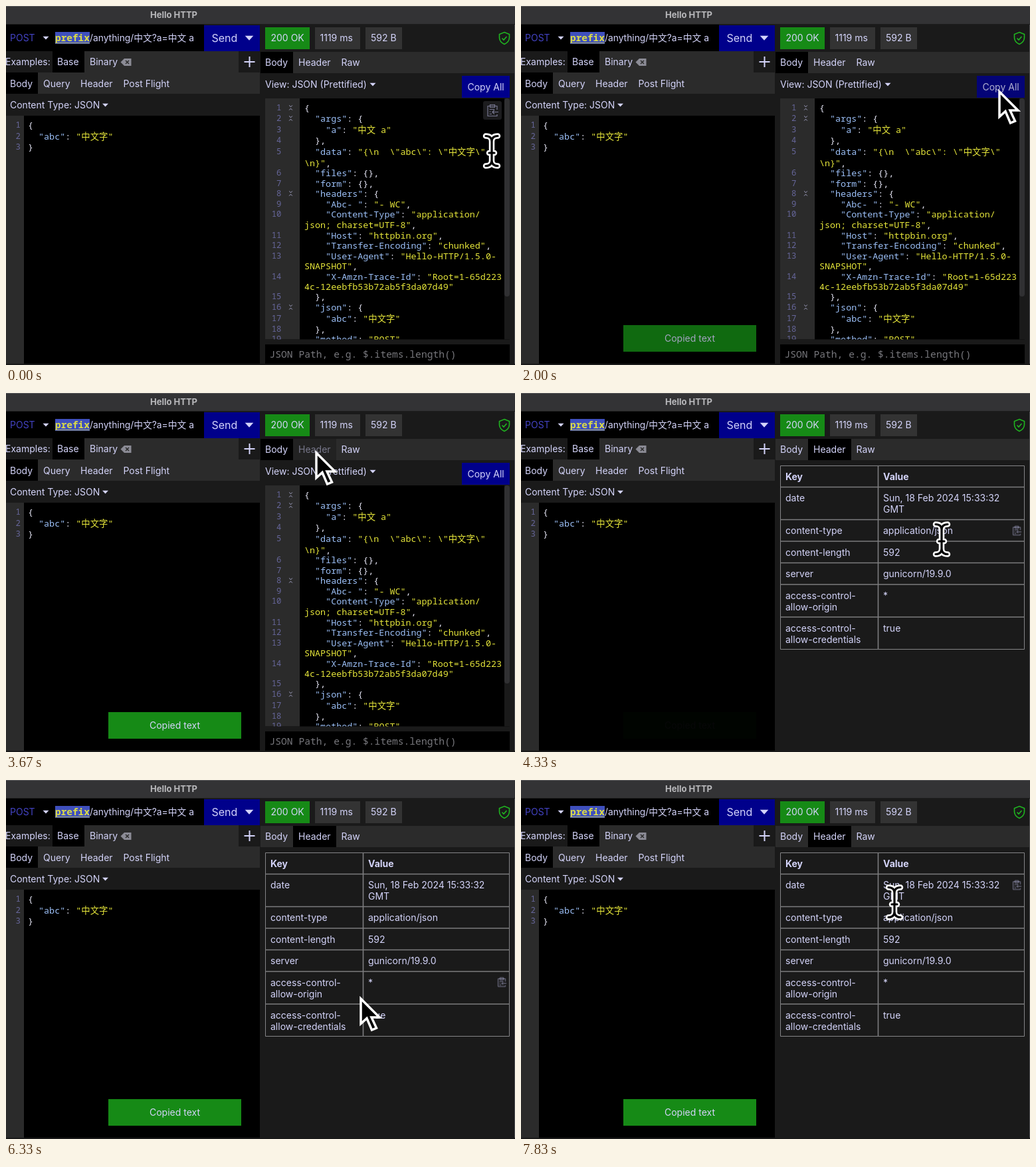
An HTML page that plays this animation: 766 by 540 pixels, repeating every 8000 ms.

```html
<!DOCTYPE html>
<html lang="en">
<head>
<meta charset="utf-8">
<title>Hello HTTP</title>
<style>
  html, body { margin: 0; width: 100%; height: 100%; overflow: hidden; background: #000; }
  svg { display: block; width: 100vw; height: 100vh; }
  text { white-space: pre; font: 14px Inter, "Noto Sans CJK SC", sans-serif; fill: #d4d4fa; }
  .mono text, text.mono { font: 13.38px "Noto Sans Mono", "Noto Sans CJK SC", monospace; fill: #e6e6f6; }
  .mono .key { fill: #9cc0f8; }
  .mono .str { fill: #e6e63a; }
  .mono .num { font-size: 12.3px; fill: #66669a; text-anchor: end; }
  .line { fill: none; stroke: #a8a8cc; }
  .blue { fill: #00008b; }
  .gray { fill: #2b2b2b; }
  .dark { fill: #1a1a1a; }
  .tile { fill: #333; }

  .anim { animation: 8s step-end infinite paused; }
  #bodyView { animation-name: leave; }
  #headerView { animation-name: enter; }
  #headerTab { animation-name: tabHover; }
  #copyAll { animation-name: copyHover; }
  #editorCopy { animation-name: editorCopy; }
  #rowCopy { animation-name: rowCopy; }
  #toast { animation-name: toast; animation-timing-function: linear; }
  #pointer { animation-name: move; animation-timing-function: ease-in-out; }
  #shape { animation-name: shape; }
  #arrow { opacity: var(--arrow); }
  #beam { opacity: calc(1 - var(--arrow)); }

  @keyframes leave { 0% { opacity: 1 } 48.9% { opacity: 0 } }
  @keyframes enter { 0% { opacity: 0 } 48.9% { opacity: 1 } }
  @keyframes tabHover { 0% { opacity: 1 } 42% { opacity: .5 } 50% { opacity: 1 } }
  @keyframes copyHover { 0% { opacity: 1 } 20.5% { opacity: .82 } 38.5% { opacity: 1 } }
  @keyframes editorCopy { 0% { opacity: 1 } 6% { opacity: .55 } 18.5% { opacity: 0 } }
  @keyframes rowCopy {
    0% { opacity: 0; transform: translate(746px, 207px) }
    53% { opacity: 1; transform: translate(746px, 207px) }
    60% { opacity: .6; transform: translate(746px, 207px) }
    75% { opacity: 0; transform: translate(746px, 304px) }
    77.8% { opacity: 1; transform: translate(746px, 304px) }
    84.5% { opacity: .6; transform: translate(746px, 304px) }
    92% { opacity: 0; transform: translate(746px, 158px) }
    95% { opacity: 1; transform: translate(746px, 158px) }
  }
  @keyframes toast {
    0%, 7.5% { opacity: 0 }
    10%, 23.5% { opacity: 1 }
    25% { opacity: .77 }
    28%, 29.5% { opacity: 0 }
    32%, 48% { opacity: 1 }
    54.17% { opacity: .03 }
    54.5%, 64.5% { opacity: 0 }
    67%, 100% { opacity: 1 }
  }
  @keyframes move {
    0%, 2% { transform: translate(731px, 218px) }
    8%, 16.5% { transform: translate(731px, 157px) }
    22.5%, 37% { transform: translate(718px, 124px) }
    43%, 49% { transform: translate(465px, 85px) }
    54.17%, 56.5% { transform: translate(633px, 220px) }
    62%, 73% { transform: translate(746px, 207px) }
    79.17% { transform: translate(532px, 324px) }
    85.4%, 90% { transform: translate(746px, 304px) }
    97.9%, 100% { transform: translate(562px, 184px) }
  }
  @keyframes shape {
    0% { --arrow: 0 } 5% { --arrow: 1 }
    51% { --arrow: 0 } 60% { --arrow: 1 }
    74.5% { --arrow: 0 } 78.5% { --arrow: 1 }
    80.5% { --arrow: 0 } 84.5% { --arrow: 1 }
    91% { --arrow: 0 }
  }
</style>
</head>
<body>
<svg viewBox="0 0 766 540" preserveAspectRatio="none">
  <defs>
    <path id="down" d="M-4.5 -2.3H4.5L0 2.6Z" fill="#d4d4fa"/>
    <path id="fold" class="line" d="M-2.3 -3.5L0 -1.2 2.3 -3.5M-2.3 3.5L0 1.2 2.3 3.5"/>
    <g id="clip" class="line" stroke-width="1.2">
      <path d="M7 -1V-6.5H-7V8.5H7V6M-3.5 -6.5V-8.5H3.5V-4.5H-3.5V-6.5M9 2.5H0M3 -.5L0 2.5 3 5.5M-4.5 -1.5H3M-4.5 2H-2.5M-4.5 5.5H-1"/>
    </g>
    <clipPath id="editorClip"><rect x="390" y="139" width="368" height="362.5"/></clipPath>
  </defs>

  <!-- window -->
  <rect class="dark" width="766" height="540"/>
  <rect width="766" height="28" fill="#333335"/>
  <path d="M0 .5H766" stroke="#5a5a5c"/>
  <path d="M0 27.5H766" stroke="#1c1c1c"/>
  <text x="217" y="18" style="font-size:13px;font-weight:700;fill:#b9b9bc">Hello HTTP</text>

  <!-- request -->
  <rect y="28" width="298" height="40"/>
  <text x="6" y="53" style="fill:#4343c4">POST</text>
  <use href="#down" x="60" y="48"/>
  <rect x="74" y="39" width="52" height="18" fill="#3f50bd"/>
  <text class="mono" x="74" y="53" style="font-size:14.4px;font-weight:600;fill:#dcdc46">prefix</text>
  <path d="M74 55.5H126" stroke="#b5b860"/>
  <text x="126" y="53" style="font-size:13.8px">/anything/中文?a=中文 a</text>
  <rect class="blue" x="298" y="29" width="84" height="39"/>
  <text x="309.5" y="54" style="font-size:16px">Send</text>
  <use href="#down" transform="translate(366 48) scale(1.4)"/>

  <rect class="gray" y="68" width="382" height="64"/>
  <rect class="dark" y="68" width="70" height="32"/>
  <rect x="70" y="68" width="48" height="32"/>
  <rect class="dark" x="350" y="68" width="32" height="32"/>
  <text x="-1" y="89">Examples:</text>
  <text x="77" y="89">Base</text>
  <text x="126" y="89">Binary</text>
  <path d="M172.5 84.5L178 79H188.5V90H178Z" fill="#8b8b95"/>
  <path d="M180 82L185 87M185 82L180 87" stroke="#2b2b2b" stroke-width="1.5"/>
  <path d="M358.5 84H374.5M366.5 76V92" stroke="#d4d4fa" stroke-width="2"/>
  <rect y="100" width="48" height="32"/>
  <text x="6" y="122">Body</text>
  <text x="56" y="122">Query</text>
  <text x="112" y="122">Header</text>
  <text x="176.5" y="122">Post Flight</text>

  <text x="6" y="154">Content Type: JSON</text>
  <use href="#down" x="149.5" y="149"/>
  <rect x="27" y="165" width="355" height="373"/>
  <rect class="gray" y="165" width="27" height="373"/>
  <g id="requestCode" class="mono"></g>

  <!-- response -->
  <rect x="390" y="32" width="67" height="33" fill="#168a16"/>
  <rect class="tile" x="465" y="32" width="68" height="33"/>
  <rect class="tile" x="541" y="32" width="55" height="33"/>
  <text x="398.5" y="53">200 OK</text>
  <text x="472.5" y="53">1119 ms</text>
  <text x="549" y="53">592 B</text>
  <path d="M750 39.5L757.5 42.5V48Q757 54.5 750 57.5Q743 54.5 742.5 48V42.5ZM746.5 48.5L749 51 753.5 46" fill="none" stroke="#20b520" stroke-width="1.6"/>
  <rect class="gray" x="383" y="69" width="382" height="32"/>

  <g id="bodyView" class="anim">
    <rect x="383" y="69" width="49" height="32"/>
    <text x="390" y="123">View: JSON (Prettified)</text>
    <use href="#down" x="552" y="118"/>
    <g id="copyAll" class="anim">
      <rect class="blue" x="686" y="105" width="72" height="33"/>
      <text x="694.5" y="127">Copy All</text>
    </g>
    <g clip-path="url(#editorClip)">
      <rect x="390" y="139" width="368" height="363"/>
      <rect class="gray" x="390" y="139" width="52" height="363"/>
      <rect class="dark" x="750" y="139" width="8" height="363"/>
      <rect x="750" y="139" width="8" height="298" rx="4" fill="#303032"/>
      <g id="responseCode" class="mono"></g>
    </g>
    <g id="editorCopy" class="anim">
      <rect x="718" y="143" width="28" height="28" rx="3" fill="#1c1c1e"/>
      <use href="#clip" x="732" y="157" opacity=".65"/>
    </g>
    <rect x="390" y="509" width="368" height="29"/>
    <text class="mono" x="396.5" y="529" style="font-size:14.65px;fill:#77777c">JSON Path, e.g. $.items.length()</text>
  </g>

  <g id="headerView" class="anim">
    <path d="M390.5 109.5H757.5V385.5H390.5Z" fill="none" stroke="#858587"/>
    <path d="M390 141.5H758M390 190.5H758M390 223H758M390 255.5H758M390 288H758M390 337H758M537.5 109V386" stroke="#7c7c7e" stroke-width="1.6"/>
    <g id="headerCells"></g>
    <g id="rowCopy" class="anim"><use href="#clip" transform="scale(.78)" opacity=".75"/></g>
  </g>

  <text x="390" y="90">Body</text>
  <rect class="dark" x="432" y="69" width="65" height="32"/>
  <g id="headerTab" class="anim">
    <rect class="gray" x="432" y="69" width="65" height="32"/>
    <g class="anim" style="animation-name:enter"><rect x="432" y="69" width="65" height="32"/></g>
    <text x="440" y="90">Header</text>
  </g>
  <text x="504.5" y="90">Raw</text>
  <path d="M765.5 28V540" stroke="#4e4e50"/>
  <path d="M0 539H766" stroke="#1a1a1a" stroke-width="2"/>

  <g id="toast" class="anim">
    <rect x="154" y="480" width="200" height="40" fill="#168a16"/>
    <text x="254" y="505" text-anchor="middle">Copied text</text>
  </g>

  <g id="pointer" class="anim"><g id="shape" class="anim">
    <path id="arrow" d="M2 5V42.5L11 34.500 18.500 52 25.500 49 18 33H30Z" stroke="#fff" stroke-width="3.500"/>
    <g id="beam" fill="none" stroke-linecap="round">
      <path id="beamPath" d="M-9 -22.500Q0 -22.500 0 -14V14Q0 22.500 -9 22.500M9 -22.500Q0 -22.500 0 -14M0 14Q0 22.500 9 22.500M-4 3H4" stroke="#fff" stroke-width="8.500"/>
      <use href="#beamPath" id="beamCore"/>
    </g>
  </g></g>
</svg>
<script>
const NS = 'http://www.w3.org/2000/svg';
const $ = id => document.getElementById(id);

function add(parent, tag, attrs, content = '') {
  const node = document.createElementNS(NS, tag);
  for (const name in attrs) node.setAttribute(name, attrs[name]);
  node.textContent = content;
  parent.append(node);
  return node;
}

// The beam's dark core repeats its outline with a thinner stroke.
const core = $('beamPath').cloneNode();
core.removeAttribute('id');
core.setAttribute('stroke', '#000');
core.setAttribute('stroke-width', 3.2);
$('beamCore').replaceWith(core);

function codeLine(parent, x, y, source) {
  const line = add(parent, 'text', { x, y });
  const wrapped = !/^[\s{}]/.test(source);
  const tokens = wrapped
    ? source.match(/.*"|.+/g)
    : source.match(/"(?:\\.|[^"\\])*"?|[^"]+/g);
  tokens.forEach((token, i) => {
    const isString = token[0] === '"' || (wrapped && i === 0);
    const isKey = isString && tokens[i + 1]?.startsWith(':');
    add(line, 'tspan', { class: isKey ? 'key' : isString ? 'str' : '' }, token);
  });
}

// Rows are [centre y, text]; wrapped continuations carry no number.
function codeBlock(parent, x, numberX, rows, foldX) {
  let number = 0;
  for (const [y, source] of rows) {
    codeLine(parent, x, y + 4.5, source);
    if (!/^[\s{}]/.test(source)) continue;
    add(parent, 'text', { class: 'num', x: numberX, y: y + 4 }, ++number);
    if (foldX && source.endsWith('{')) add(parent, 'use', { href: '#fold', x: foldX, y });
  }
}

codeBlock($('requestCode'), 33, 22, [
  [179, '{'], [196, '  "abc": "中文字"'], [212, '}']
]);

codeBlock($('responseCode'), 449, 414.5, [
  [153, '{'],
  [169, '  "args": {'],
  [186, '    "a": "中文 a"'],
  [202, '  },'],
  [219, String.raw`  "data": "{\n  \"abc\": \"中文字\"`],
  [236, String.raw`\n}",`],
  [251, '  "files": {},'],
  [267, '  "form": {},'],
  [282, '  "headers": {'],
  [298, '    "Abc- ": "- WC",'],
  [313, '    "Content-Type": "application/'],
  [329, 'json; charset=UTF-8",'],
  [345, '    "Host": "httpbin.org",'],
  [360, '    "Transfer-Encoding": "chunked",'],
  [376, '    "User-Agent": "Hello-HTTP/1.5.0-'],
  [391, 'SNAPSHOT",'],
  [407, '    "X-Amzn-Trace-Id": "Root=1-65d223'],
  [422, '4c-12eebfb53b72ab5f3da07d49"'],
  [437, '  },'],
  [453, '  "json": {'],
  [470, '    "abc": "中文字"'],
  [486, '  },'],
  [501, '  "method": "POST",']
], 428.5);

const headers = [
  [131, 'Key', 'Value'],
  [163, 'date', 'Sun, 18 Feb 2024 15:33:32|GMT'],
  [212, 'content-type', 'application/json'],
  [245, 'content-length', '592'],
  [277, 'server', 'gunicorn/19.9.0'],
  [310, 'access-control-|allow-origin', '*'],
  [359, 'access-control-|allow-credentials', 'true']
];
headers.forEach(([y, ...cells], row) => cells.forEach((cell, column) =>
  cell.split('|').forEach((part, i) => add($('headerCells'), 'text', {
    x: column ? 545 : 398, y: y + i * 16.5, style: row ? '' : 'font-weight:700'
  }, part))));

const animations = document.getAnimations();
const start = performance.now();
function tick() {
  const time = (performance.now() - start) % 8000;
  const step = Math.floor((time + 5) * 6 / 1000) % 48;
  for (const animation of animations) animation.currentTime = step * 1000 / 6;
  requestAnimationFrame(tick);
}
tick();
</script>
</body>
</html>
```
